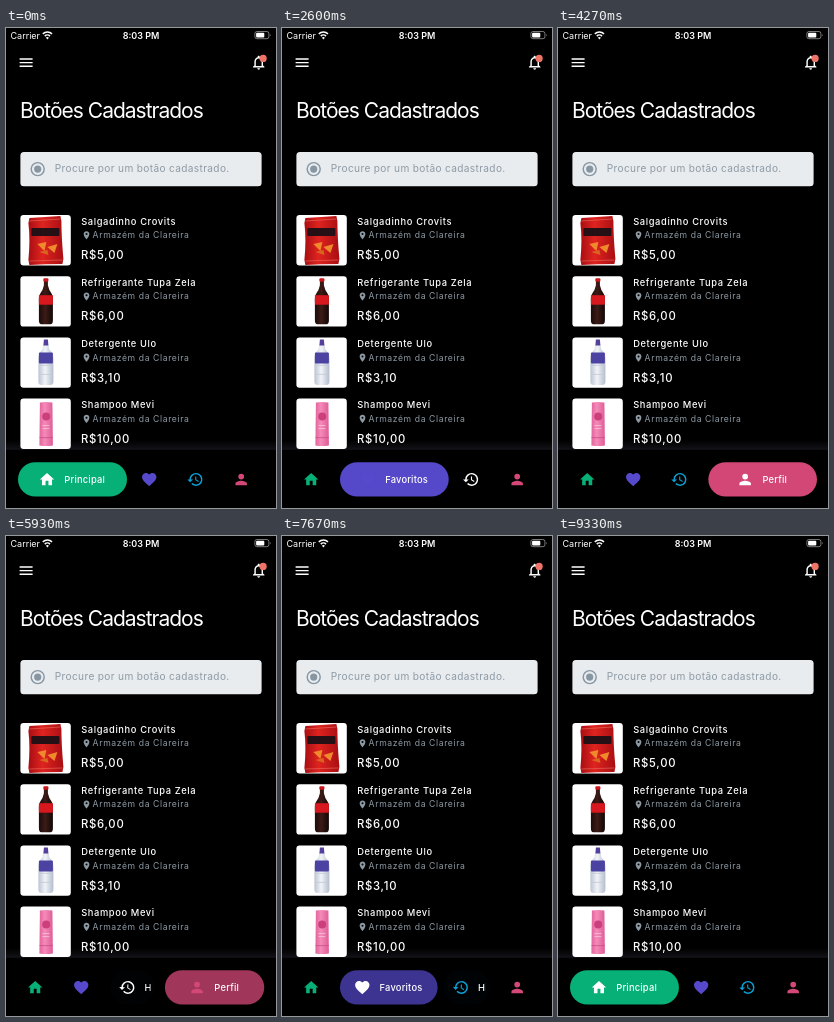
An HTML page for the animation above (9390 ms loop, 270x480 px).

```html
<!DOCTYPE html>
<html lang="pt-BR">
<head>
<meta charset="utf-8">
<title>Botões Cadastrados</title>
<style>
  html, body { margin: 0; width: 100%; height: 100%; overflow: hidden; background: #000; }
  svg { display: block; width: 270px; height: 480px; font-family: Inter, Roboto, sans-serif; fill: #fff; }
  .status { font-size: 9px; }
  .title { font-size: 21px; letter-spacing: -1px; }
  .hint { font-size: 10.08px; letter-spacing: .36px; fill: #8d9aa5; }
  .name { font-size: 9.3px; letter-spacing: .63px; font-weight: 500; }
  .place { font-size: 8.64px; letter-spacing: .6px; fill: #8d99a3; }
  .price { font-size: 11.3px; letter-spacing: .72px; font-weight: 500; }
  .label { font-size: 9.36px; letter-spacing: .2px; font-weight: 500; }
</style>
</head>
<body>
<svg viewBox="0 0 270 480">
  <defs>
    <linearGradient id="glow" x2="0" y2="1">
      <stop offset="0" stop-color="#1a1a22" stop-opacity="0"/>
      <stop offset="1" stop-color="#1a1a22" stop-opacity=".75"/>
    </linearGradient>
    <linearGradient id="bag">
      <stop offset="0" stop-color="#a80d12"/>
      <stop offset=".4" stop-color="#df2420"/>
      <stop offset="1" stop-color="#a90e13"/>
    </linearGradient>
    <linearGradient id="cola">
      <stop offset="0" stop-color="#1a0c0a"/>
      <stop offset=".45" stop-color="#3c1b16"/>
      <stop offset="1" stop-color="#120706"/>
    </linearGradient>
    <linearGradient id="clear">
      <stop offset="0" stop-color="#bcc4d2"/>
      <stop offset=".45" stop-color="#f1f4f8"/>
      <stop offset="1" stop-color="#b4bdcd"/>
    </linearGradient>
    <linearGradient id="pink">
      <stop offset="0" stop-color="#e2639b"/>
      <stop offset=".4" stop-color="#f58ab8"/>
      <stop offset="1" stop-color="#dd5c95"/>
    </linearGradient>
  </defs>
  <rect width="270" height="480" fill="#000"/>

  <!-- status bar -->
  <g class="status">
    <text x="4.5" y="10.6">Carrier</text>
    <text x="135" y="10.9" text-anchor="middle" font-weight="600">8:03 PM</text>
    <path d="M36.8 5.9a6.500 6.500 0 0 1 9.2 0M38.8 8.1a3.700 3.700 0 0 1 5.2 0" fill="none" stroke="#fff" stroke-width="1.5"/>
    <path d="M41.4 11.500l-1.500-1.700a2.200 2.200 0 0 1 3 0z"/>
    <rect x="248.9" y="3.5" width="14" height="7.2" rx="2" fill="none" stroke="#999" stroke-width=".8"/>
    <rect x="250.1" y="4.7" width="8.2" height="4.8" rx="1"/>
    <path d="M264 5.900q1.400 1.200 0 2.400z" fill="#999"/>
  </g>

  <!-- header -->
  <path d="M13.600 31h13M13.600 34.600h13M13.600 38.200h13" stroke="#fff" stroke-width="1.44"/>
  <path transform="translate(252.7 34.5) scale(.72) translate(-12 -12)" d="M12 22c1.1 0 2-.9 2-2h-4c0 1.1.9 2 2 2zm6-6v-5c0-3.07-1.63-5.64-4.500-6.32V4c0-.83-.67-1.500-1.500-1.500s-1.500.67-1.500 1.500v.68C7.64 5.36 6 7.92 6 11v5l-2 2v1h16v-1l-2-2zm-2 1H8v-6c0-2.48 1.51-4.500 4-4.500s4 2.02 4 4.500v6z"/>
  <circle cx="257.1" cy="30.4" r="3.6" fill="#ee7468"/>
  <text class="title" x="14" y="90.2">Botões Cadastrados</text>

  <!-- search -->
  <rect x="14.4" y="124.1" width="241.2" height="34.2" rx="3.5" fill="#e9ecef"/>
  <circle cx="31.7" cy="141.1" r="6.5" fill="none" stroke="#8696a3" stroke-width="1.45"/>
  <circle cx="31.7" cy="141.1" r="3.6" fill="#8696a3"/>
  <text class="hint" x="48.8" y="143.8">Procure por um botão cadastrado.</text>

  <rect y="412" width="270" height="10" fill="url(#glow)"/>
  <g id="list"></g>
  <rect y="421.8" width="270" height="58.2" fill="#000"/>
  <g id="bar"></g>
</svg>

<script>
const LOOP = 9390, FPS = 15, DURATION = 750;
const NS = 'http://www.w3.org/2000/svg';

function add(parent, tag, attrs = {}, text = '') {
  const el = document.createElementNS(NS, tag);
  set(el, attrs);
  el.textContent = text;
  parent.append(el);
  return el;
}
function set(el, attrs) {
  for (const key in attrs) el.setAttribute(key, attrs[key]);
}

// Product art sits in a 51 x 51 tile.
const art = {
  chips: `<path d="M9 3l31-2 1 5q0 16 2 38l-1 5q-17 0-33 1l-1-5q2-20 0-37z" fill="url(#bag)"/>
    <path d="M9 6l31-2M9 46l33-1" stroke="#ec6f61" stroke-width=".6"/>
    <rect x="11" y="13" width="28" height="8" rx="1" fill="#241015"/>
    <path d="M17 29l9-2-2 9zM27 32l10-3-3 9z" fill="#ef8a2c"/>
    <path d="M19 37l8-2 1 5z" fill="#d9661f"/>`,
  soda: `<path d="M23.500 4h4v5q1 5 3.500 8 2 3 1.500 9v18q0 4-2.500 4h-9q-2.500 0-2.500-4V26q-.5-6 1.500-9 2.500-3 3.500-8z" fill="url(#cola)"/>
    <rect x="23" y="2" width="5" height="3.500" rx="1" fill="#c9151c"/>
    <rect x="18.500" y="19" width="14" height="9.500" fill="#d8181f"/>`,
  soap: `<path d="M23 7h5l1 5q4 4 4 9v23q0 3.500-3 3.500h-9q-3 0-3-3.500V21q0-5 4-9z" fill="url(#clear)"/>
    <path d="M23.500 2h4l.5 6h-5z" fill="#54409c"/>
    <rect x="18.500" y="15" width="14" height="11" rx="1" fill="#4b42a1"/>
    <path d="M18.500 28h14M18.500 37h14" stroke="#c3cad8" stroke-width=".8"/>`,
  shampoo: `<path d="M19.500 4q6-1 12.500 0l.5 43q-7 1-13.500 0z" fill="url(#pink)"/>
    <path d="M19 39h13.500" stroke="#c64a83" stroke-width=".7"/>
    <circle cx="25.800" cy="18" r="4" fill="#cb3f7c"/>
    <path d="M22 27h7M22 30h7" stroke="#fbd1e2" stroke-width=".7"/>`
};
const products = [
  ['Salgadinho Crovits', 'R$5,00', art.chips],
  ['Refrigerante Tupa Zela', 'R$6,00', art.soda],
  ['Detergente Ulo', 'R$3,10', art.soap],
  ['Shampoo Mevi', 'R$10,00', art.shampoo]
];
const PIN = 'M12 2C8.13 2 5 5.13 5 9c0 5.25 7 13 7 13s7-7.75 7-13c0-3.87-3.13-7-7-7zm0 9.500a2.500 2.500 0 0 1 0-5 2.500 2.500 0 0 1 0 5z';

const list = document.querySelector('#list');
products.forEach(([name, price, picture], i) => {
  const row = add(list, 'g', { transform: `translate(0 ${187 + i * 61.2})` });
  add(row, 'rect', { x: 14.4, width: 50.4, height: 50.4, rx: 3.2 });
  add(row, 'g', { transform: 'translate(14.4 0)' }).innerHTML = picture;
  add(row, 'text', { class: 'name', x: 75.2, y: 9.5 }, name);
  add(row, 'path', { d: PIN, fill: '#8d99a3', transform: 'translate(75.6 15.4) scale(.41)' });
  add(row, 'text', { class: 'place', x: 86.6, y: 23.2 }, 'Armazém da Clareira');
  add(row, 'text', { class: 'price', x: 75, y: 44.2 }, price);
});

const tabs = [
  { label: 'Principal', width: 41, color: [7, 176, 119],
    icon: 'M10 20v-6h4v6h5v-8h3L12 3 2 12h3v8z' },
  { label: 'Favoritos', width: 43, color: [86, 73, 203],
    icon: 'M12 21.35l-1.45-1.32C5.4 15.36 2 12.28 2 8.500 2 5.42 4.42 3 7.500 3c1.74 0 3.41.81 4.500 2.09C13.09 3.81 14.76 3 16.500 3 19.58 3 22 5.42 22 8.500c0 3.78-3.4 6.86-8.55 11.54z' },
  { label: 'Histórico', width: 43, color: [10, 162, 214], turn: 180,
    icon: 'M13 3a9 9 0 0 0-9 9H1l3.89 3.89.07.14L9 12H6a7 7 0 1 1 2.06 4.94l-1.42 1.42A9 9 0 1 0 13 3zm-1 5v5l4.28 2.54.72-1.21-3.500-2.08V8z' },
  { label: 'Perfil', width: 25, color: [212, 72, 120],
    icon: 'M12 12a4 4 0 1 0 0-8 4 4 0 0 0 0 8zm0 2c-2.67 0-8 1.34-8 4v2h16v-2c0-2.66-5.33-4-8-4z' }
];
const bar = document.querySelector('#bar');
tabs.forEach((tab, i) => {
  const clip = add(bar, 'clipPath', { id: 'clip' + i });
  tab.window = add(clip, 'rect', { y: 434, height: 36 });
  tab.pill = add(bar, 'rect', { y: 434.2, height: 34.4, rx: 17.2 });
  tab.glyph = add(bar, 'path', { d: tab.icon });
  const view = add(bar, 'g', { 'clip-path': `url(#clip${i})` });
  tab.text = add(view, 'text', { class: 'label', y: 454.7 }, tab.label);
});

// Start time and chosen tab of each move.
const moves = [[1457, 1], [2599, 2], [3648, 3], [5899, 2], [7319, 1], [8657, 0]];

function drawTab(tab, left, open, focused) {
  const width = 35 + 74 * open;
  const iconX = left + Math.max(17.2, (width - 26 - tab.width) / 2 + 8);
  const rgb = tab.color.map(c => Math.round(c * open));
  set(tab.pill, { x: left, width, fill: `rgba(${rgb},${open})` });
  set(tab.window, { x: left, width: width - 4 });
  set(tab.glyph, {
    fill: focused ? '#fff' : `rgb(${tab.color})`,
    transform: `translate(${iconX} 451.4) rotate(${(tab.turn || 0) * open * open}) scale(.72) translate(-12 -12)`
  });
  set(tab.text, { x: iconX + 17.3 });
}

function render(now) {
  const frame = Math.floor((now % LOOP) * FPS / 1000 + .1);
  const time = frame * 1000 / FPS;
  let from = 0, to = 0, start = -DURATION;
  for (const [at, tab] of moves) {
    if (time < at) break;
    [from, to, start] = [to, tab, at];
  }
  const u = Math.min(1, (time - start) / DURATION);
  const eased = 1 - (1 - u) ** 3;
  let x = 6;
  tabs.forEach((tab, i) => {
    const open = i === to ? (from === to ? 1 : eased) : i === from ? 1 - eased : 0;
    drawTab(tab, x + 6, open, i === to);
    x += 46 + 68 * open;
  });
}

const begin = performance.now();
function tick() {
  render(performance.now() - begin);
  requestAnimationFrame(tick);
}
tick();
</script>
</body>
</html>
```
